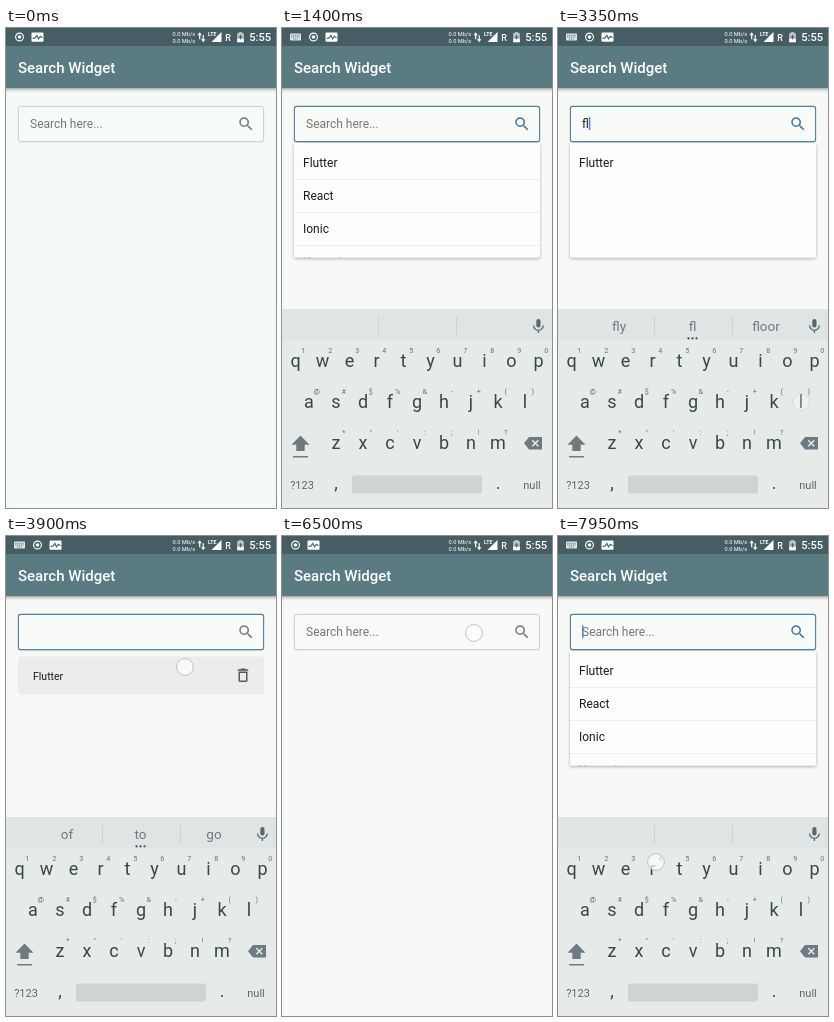
Recreate the animation shown at these times as an HTML page. Size 270 px wide and 480 px high, loop 8000 ms.

```html
<!DOCTYPE html>
<html lang="en">
<head>
<meta charset="utf-8">
<title>Search Widget</title>
<style>
html, body { margin: 0; width: 100%; height: 100%; overflow: hidden; background: #f7f9f7; }
svg { display: block; width: 100vw; height: 100vh; font-family: Roboto, sans-serif; }
.mid { text-anchor: middle; }
</style>
</head>
<body>
<svg viewBox="0 0 270 480" xmlns="http://www.w3.org/2000/svg">
  <defs>
    <filter id="soft" x="-10%" y="-20%" width="120%" height="150%">
      <feDropShadow dx="0" dy="1.2" stdDeviation="1.4" flood-color="#000" flood-opacity=".32"/>
    </filter>
    <filter id="faint" x="-10%" y="-20%" width="120%" height="150%">
      <feDropShadow dx="0" dy=".5" stdDeviation=".5" flood-color="#000" flood-opacity=".13"/>
    </filter>
    <linearGradient id="shade" x2="0" y2="1">
      <stop stop-color="#000" stop-opacity=".32"/>
      <stop offset=".45" stop-color="#000" stop-opacity=".1"/>
      <stop offset="1" stop-color="#000" stop-opacity="0"/>
    </linearGradient>
    <clipPath id="menuClip"><rect x="12" y="114" width="246" height="115.5"/></clipPath>
  </defs>

  <rect id="page" width="270" height="480"/>
  <rect y="60" width="270" height="5" fill="url(#shade)"/>
  <rect y="18" width="270" height="42" fill="#5b7b83"/>
  <rect width="270" height="18" fill="#465d64"/>
  <text x="12" y="45" font-size="15" font-weight="500" fill="#fff">Search Widget</text>

  <g id="kbIcon" fill="#dfe6e7">
    <rect x="8" y="5.5" width="11" height="7" rx=".8"/>
    <path d="M9.2 7.3h8.6M9.2 9h8.6M11 11h5" stroke="#465d64" stroke-width=".8" stroke-dasharray="1.1 .7"/>
  </g>
  <g id="notes">
    <circle cx="13.5" cy="9" r="3.9" fill="none" stroke="#fff" stroke-width="1.1"/>
    <circle cx="13.5" cy="9" r="1.8" fill="#fff"/>
    <rect x="25.5" y="4.5" width="12" height="9.3" rx="1" fill="#fff"/>
    <path d="M26.5 10.5l2.6-.6 1.8-2.6 1.6 3.6 1.8-2.6 2.2 1.4" fill="none" stroke="#465d64" stroke-width="1.1"/>
  </g>
  <g fill="#fff">
    <text x="166.5" y="8" font-size="5.7">0.0 Mb/s</text>
    <text x="166.5" y="15" font-size="5.7">0.0 Mb/s</text>
    <path d="M193.7 4.3l2.2 3h-1.6v4h-1.2v-4h-1.6zM197.2 14.3l-2.2-3h1.6v-4h1.2v4h1.6z"/>
    <text x="202" y="8.3" font-size="5.2" font-weight="700">LTE</text>
    <path d="M215.5 4v10h-10z"/>
    <text x="219.3" y="13" font-size="9" font-weight="500">R</text>
    <path d="M233 4h3v1.1h1.8v9.1h-6.6V5.1H233z" fill="#b9c4c7"/>
    <path d="M231.2 10.8h6.6v3.4h-6.6z"/>
    <path d="M235 6.2l-2.2 3.6h1.4v2.4l2.2-3.7H235z" fill="#465d64"/>
    <text x="243.2" y="13.4" font-size="11.2" font-weight="500">5:55</text>
  </g>

  <g id="card">
    <rect x="12" y="120.5" width="246" height="38" rx="2" fill="#ecedeb"/>
    <text x="27" y="143.5" font-size="10.5" fill="#1c1c1c">Flutter</text>
    <path transform="translate(228 130.3) scale(.75)" fill="#565a59" d="M6 19c0 1.1.9 2 2 2h8c1.1 0 2-.9 2-2V7H6v12zM8 9h8v10H8V9zm7.5-5l-1-1h-5l-1 1H5v2h14V4h-3.5z"/>
  </g>

  <rect id="field" x="12.4" y="78.4" width="245.2" height="35.2" rx="2.2" filter="url(#faint)"/>
  <text id="typed" x="24" y="100" font-size="12" fill="#222"></text>
  <text id="hint" x="24" y="100" font-size="12" fill="#757877">Search here...</text>
  <rect id="caret" y="89.3" width="1.5" height="12.7" fill="#4a86e0"/>
  <path id="lens" transform="translate(231 87) scale(.75)" d="M15.5 14h-.79l-.28-.27A6.471 6.471 0 0 0 16 9.5 6.5 6.5 0 1 0 9.5 16c1.61 0 3.09-.59 4.23-1.57l.27.28v.79l5 4.99L20.49 19l-4.99-5zm-6 0C7.01 14 5 11.99 5 9.5S7.01 5 9.5 5 14 7.01 14 9.5 11.99 14 9.5 14z"/>

  <g id="menu">
    <rect x="12" y="115" width="246" height="114.5" rx="2" fill="#fdfefc" filter="url(#soft)"/>
    <g id="items" clip-path="url(#menuClip)" font-size="12" fill="#1c1c1c"></g>
  </g>

  <g id="board"></g>
  <circle id="touch" r="8.4" fill="#fff" fill-opacity=".68" stroke="#bcc3c3" stroke-width="1"/>
</svg>

<script>
const $ = id => document.getElementById(id);
const LOOP = 8000;
const clamp = v => Math.max(0, Math.min(1, v));
const ramp = (t, a, b) => clamp((t - a) / (b - a));
const easeOut = p => 1 - (1 - p) ** 3;
const within = (t, a, b) => t >= a && t < b;
const show = (id, on) => $(id).setAttribute('visibility', on ? 'visible' : 'hidden');
const set = (id, attrs) => { for (const k in attrs) $(id).setAttribute(k, attrs[k]); };
const esc = s => s.replace('&', '&amp;').replace('"', '&quot;');
const mix = (a, b, p) => `rgb(${a.map((v, i) => Math.round(v + (b[i] - v) * p))})`;

const label = (x, y, size, s, fill = '#37474c', extra = '') =>
  `<text class="mid" x="${x}" y="${y}" font-size="${size}" fill="${fill}" ${extra}>${esc(s)}</text>`;

function keyRow(letters, marks, x0, y) {
  return [...letters].map((c, i) => {
    const x = x0 + 27 * i;
    return label(x, y, 18, c) + label(x + 7.7, y - 14.3, 7.2, marks[i], '#667479');
  }).join('');
}

function buildBoard() {
  $('board').innerHTML = `
    <rect y="281" width="270" height="199" fill="#e6ebea"/>
    <rect y="281" width="270" height="31" fill="#dfe5e5"/>
    <path d="M96.5 289v18M174.5 289v18" stroke="#cbd2d2"/>
    <rect id="pressed" y="354" width="26" height="39" rx="2" fill="#d9dfdf"/>
    <g id="words">${[61, 134.5, 208].map((x, i) => label(x, 303.3, 13.5, '', '#6c787c', `id="word${i}"`)).join('')}
      <path d="M130.5 310.3h9" stroke="#37474c" stroke-width="2.2" stroke-linecap="round" stroke-dasharray="0 4"/></g>
    <g fill="#59686d">
      <rect x="254.3" y="291" width="4.2" height="8.6" rx="2.1"/>
      <path d="M251.6 297.5a4.8 4.8 0 0 0 9.6 0M256.4 302v3" fill="none" stroke="#59686d" stroke-width="1.3"/>
    </g>
    ${keyRow('qwertyuiop', '1234567890', 13.5, 339)}
    ${keyRow('asdfghjkl', '@#$%&-+()', 27, 380)}
    ${keyRow('zxcvbnm', '*"\':;!?', 54, 421)}
    <path d="M18.5 407.5l9 9.2h-4.8v6.3h-8.4v-6.3H9.5zM11 428h15v1.4H11z" fill="#6d7b80"/>
    <path d="M247 409h13v12.5h-13l-5-6.25z" fill="#6d7b80"/>
    <path d="M250.3 412.2l6 6m0-6l-6 6" stroke="#e6ebea" stroke-width="1.5"/>
    ${label(20, 460.5, 11, '?123', '#59686d')}
    ${label(54, 461, 18, ',')}
    <rect x="70" y="447.5" width="130" height="18" rx="2.5" fill="#ced4d4"/>
    ${label(216, 461, 18, '.')}
    ${label(250, 460.5, 11, 'null', '#59686d')}`;
}

function buildItems() {
  $('items').innerHTML = ['Flutter', 'React', 'Ionic', 'Xamarin'].map((s, i) =>
    `<text x="21" y="${138.8 + 33 * i}"${i > 2 ? ' opacity=".6"' : ''}>${s}</text>`).join('') +
    '<path d="M12 151.5h246M12 184.5h246M12 217.5h246" stroke="#eceeec"/>';
}

// press start, release, end of fade, position
const TOUCHES = [
  [800, 900, 1000, 192, 97],
  [2500, 2600, 2750, 110, 374],
  [3200, 3300, 3400, 243, 374],
  [3650, 3900, 4000, 179, 131],
  [5550, 5700, 5800, 237, 143],
  [6500, 6600, 6700, 192, 97],
  [7950, 8000, 8000, 98, 326]
];

// focus and blink restarts
function caretOn(t) {
  if (!within(t, 900, 3850) && t < 6600) return false;
  const from = [6600, 3300, 2600, 900].find(s => t >= s);
  return Math.floor((t - from) / 500) % 2 === 0;
}

function words(t) {
  if (within(t, 2700, 3350)) return ['for', 'f', 'from'];
  if (within(t, 3350, 3850)) return ['fly', 'fl', 'floor'];
  if (within(t, 3850, 4100)) return ['of', 'to', 'go'];
  return null;
}

function draw(t) {
  const focused = within(t, 900, 3850) || t >= 6600;
  const typed = within(t, 2600, 3850) ? (t < 3300 ? 'f' : 'fl') : '';

  $('page').setAttribute('fill', t < 800 ? '#f4faf8' : '#f7f9f7');

  const up = t < 3900 ? easeOut(ramp(t, 980, 1200))
    : t < 6500 ? 1 - ramp(t, 3920, 4100) ** 1.6
    : easeOut(ramp(t, 6700, 6950));
  set('board', { transform: `translate(0 ${(1 - up) * 200})` });
  const kb = within(t, 1000, 4050) || t >= 6750;
  show('board', up > 0);
  show('kbIcon', kb);
  set('notes', { transform: `translate(${kb ? 18 : 0} 0)` });

  const glow = t < 3900 ? ramp(t, 880, 1050) : t < 6500 ? 1 - ramp(t, 3900, 4100) : ramp(t, 6580, 6750);
  set('field', {
    fill: t < 800 ? '#f6fbf9' : '#f9fbf8',
    stroke: mix([198, 205, 203], [82, 130, 158], glow),
    'stroke-width': 0.9 + 0.2 * glow
  });
  set('lens', { fill: focused ? '#437599' : '#747978' });

  $('typed').textContent = typed;
  set('hint', { opacity: t < 3850 ? 1 - ramp(t, 2550, 2780) : ramp(t, 3900, 4100) });
  if (within(t, 2750, 3900)) set('hint', { opacity: 0 });
  set('caret', { x: 24 + (typed ? $('typed').getComputedTextLength() : 0) });
  show('caret', caretOn(t));

  show('menu', within(t, 950, 3850) || t >= 6650);
  [...$('items').children].forEach((el, i) =>
    el.setAttribute('display', i && typed ? 'none' : 'inline'));
  show('card', within(t, 3850, 5750));

  const list = words(t);
  $('words').setAttribute('display', list ? 'inline' : 'none');
  if (list) list.forEach((w, i) => { $('word' + i).textContent = w; });

  const hit = TOUCHES.find(p => within(t, p[0], p[2]));
  show('touch', hit);
  $('pressed').setAttribute('display', 'none');
  if (hit) {
    const [a, b, end, x, y] = hit;
    set('touch', { cx: x, cy: y, opacity: t <= b ? 1 : 1 - ramp(t, b, end) * 1.2 });
    if (y === 374 && t < b) set('pressed', { display: 'inline', x: x - 15 });
  }
}

buildBoard();
buildItems();
const start = performance.now();
function tick() {
  const t = (performance.now() - start) % LOOP;
  draw(Math.floor(t / 50) * 50);
  requestAnimationFrame(tick);
}
tick();
</script>
</body>
</html>
```
